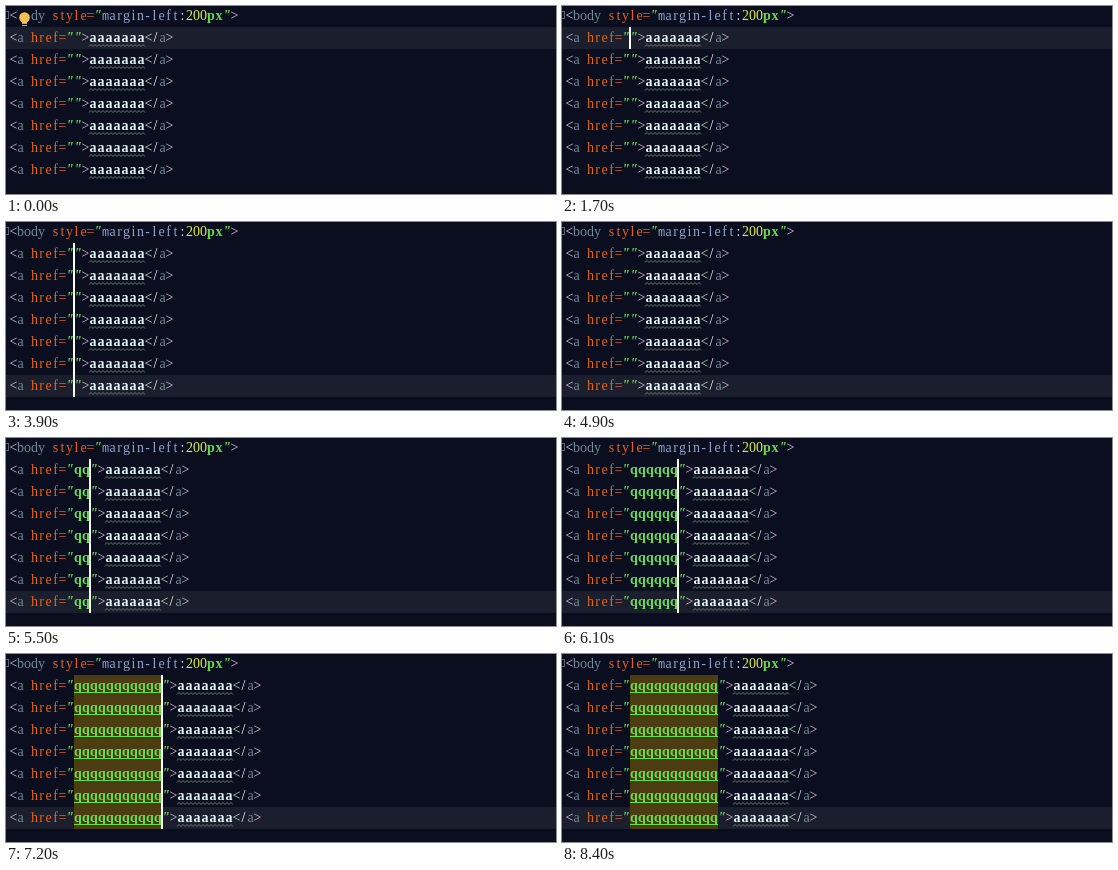
An HTML page with a canvas that plays this animation: 550x188 px, repeating every 8.5 s.

```html
<!DOCTYPE html>
<html lang="en">
<head>
<meta charset="utf-8">
<title>Multiple carets</title>
<style>
html, body { margin: 0; width: 100%; height: 100%; overflow: hidden; background: #0b0e1e; }
canvas { display: block; }
</style>
</head>
<body>
<canvas id="stage" width="550" height="188"></canvas>
<script>
(() => {
  const ctx = document.getElementById('stage').getContext('2d');
  const LOOP = 8500, ROW = 22, LEFT = 4, VALUE_X = 68, LINES = 7;
  const C = {
    bg: '#0b0e1e', row: '#1b1e2d', select: '#25407c', link: '#4b3c12',
    bracket: '#e6c3e4', tag: '#74899a', attr: '#e8640f', string: '#62e04a',
    style: '#8fa2cc', text: '#e4f8f6', close: '#c4e8c8', number: '#dcec4c',
    wave: '#66806b', white: '#ffffff'
  };
  const caretTimes = [1700, 2600, 2900, 3100, 3300, 3500, 3900];
  const typeTimes = [5200, 5500, 5600, 5800, 5900, 6100, 6200, 6400, 6500, 6700, 6800];

  const passed = (times, t) => times.filter(s => s <= t).length;
  const rowY = line => line * ROW - 1;

  function rect(color, x, y, w, h) {
    ctx.fillStyle = color;
    ctx.fillRect(x, y, w, h);
  }

  // Regular cells are 7px wide, bold cells 8px.
  function write(str, x, line, color, bold) {
    const cell = bold ? 8 : 7;
    ctx.fillStyle = color;
    ctx.textAlign = 'center';
    for (const ch of str) {
      const slant = ch === '"' ? 'italic ' : '';
      const font = ch === 'm' ? '12px "Liberation Mono", monospace' : '14px "Liberation Serif", serif';
      ctx.font = slant + (bold ? 'bold ' : '') + font;
      ctx.fillText(ch, x + cell / 2, rowY(line) + 15);
      x += cell;
    }
    return x;
  }

  function writeAll(parts, line) {
    return parts.reduce((x, [str, color, bold]) => write(str, x, line, color, bold), LEFT);
  }

  function wave(x, y, width) {
    ctx.strokeStyle = C.wave;
    ctx.lineWidth = 1;
    ctx.beginPath();
    for (let i = 0; i <= width; i += 2) ctx.lineTo(x + i, y + (i % 4 ? 0 : 2));
    ctx.stroke();
  }

  function drawHeader(bulb) {
    rect('#596070', 0, 5, 3, 1);
    rect('#596070', 0, 12, 3, 1);
    rect('#596070', 2, 5, 1, 8);
    writeAll([
      ['<', C.bracket], ['body', C.tag], [' style=', C.attr], ['"', C.string, true],
      ['margin-left', C.style], [':', C.text], ['200', C.number], ['px', C.string, true],
      ['"', C.string, true], ['>', C.bracket]
    ], 0);
    if (!bulb) return;
    rect(C.bg, 12, 0, 13, 21);
    ctx.fillStyle = '#f3c052';
    ctx.beginPath();
    ctx.arc(18.5, 11.5, 5.3, 0, Math.PI * 2);
    ctx.fill();
    rect('#f3c052', 16, 15, 5, 2);
    rect('#a9adb5', 16, 17, 5, 1);
    rect('#a9adb5', 16, 19, 5, 1);
  }

  function drawLink(line, typed) {
    const end = writeAll([
      ['<', C.bracket], ['a', C.tag], [' href=', C.attr], ['"', C.string, true],
      ['q'.repeat(typed), C.string, true], ['"', C.string, true], ['>', C.bracket],
      ['aaaaaaa', C.text, true], ['<', C.close], ['/', C.white], ['a', C.tag], ['>', C.bracket]
    ], line);
    wave(end - 84, rowY(line) + 17.5, 56);
  }

  function draw(t) {
    const typed = passed(typeTimes, t);
    const carets = passed(caretTimes, t);
    const linked = t >= 7200;
    const selecting = t >= 2600 && t < 2800;
    const hidden = (t >= 4900 && t < 5200) || (t >= 7800 && t < 8300) || t >= 8400;

    rect(C.bg, 0, 0, 550, 188);
    rect(C.row, 0, rowY(Math.max(1, carets)), 550, ROW);
    if (linked) rect(C.link, VALUE_X, rowY(1), typed * 8, LINES * ROW);
    if (selecting) rect(C.select, 60, rowY(1), 8, 2 * ROW);

    drawHeader(t < 1700);
    for (let line = 1; line <= LINES; line++) {
      drawLink(line, typed);
      if (linked) rect(C.string, VALUE_X, rowY(line) + 17, typed * 8, 1);
    }

    if (selecting) {
      rect(C.white, 59, rowY(1), 2, 2 * ROW);
      rect(C.white, 67, rowY(1), 2, ROW);
    } else if (!hidden) {
      rect(C.white, VALUE_X - 1 + typed * 8, rowY(1), 2, carets * ROW);
    }
  }

  const start = performance.now();
  function tick() {
    draw(Math.max(0, performance.now() - start) % LOOP);
    requestAnimationFrame(tick);
  }
  tick();
})();
</script>
</body>
</html>
```
